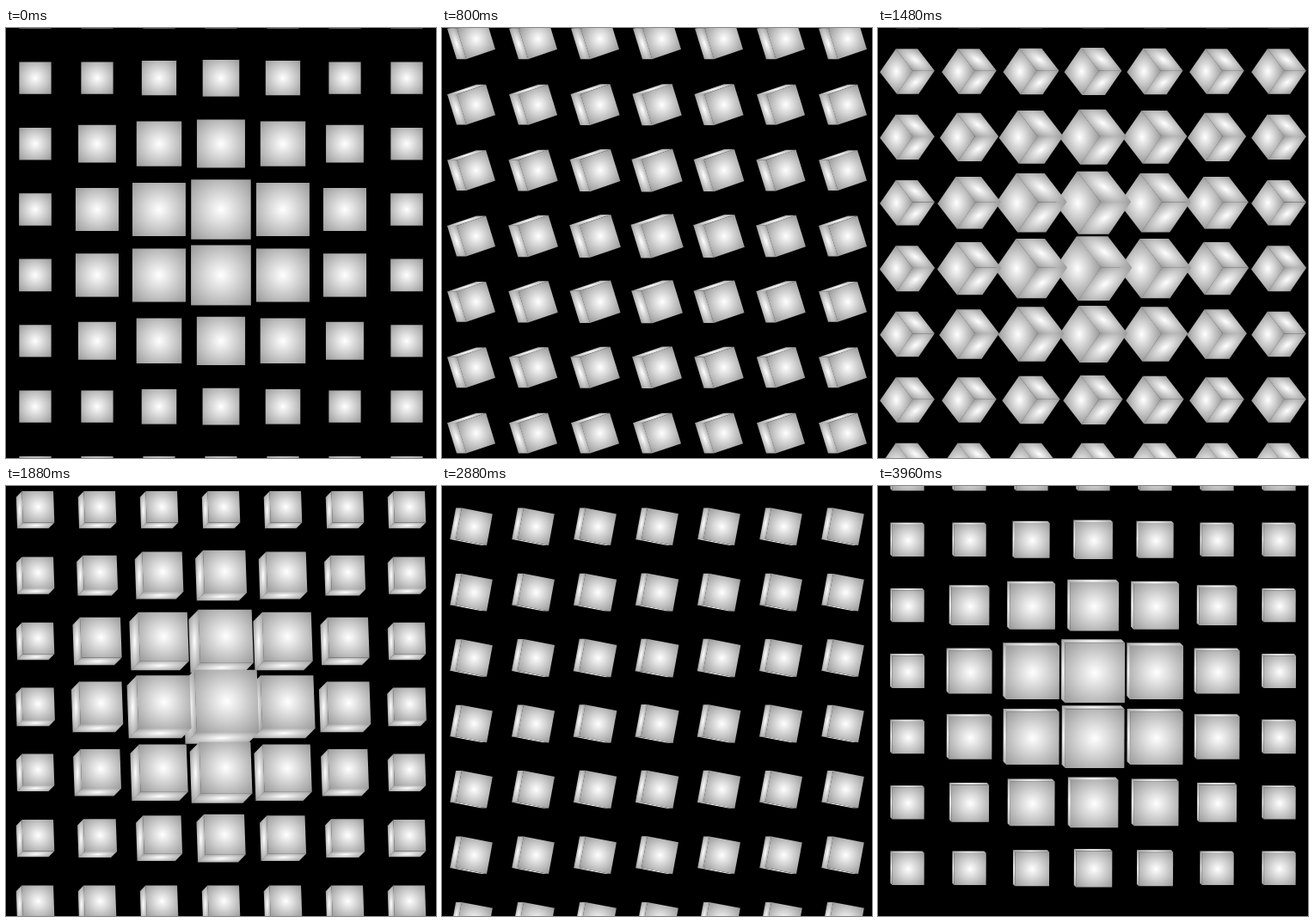
Recreate the animation shown at these times as an HTML page with a canvas. Size 500 by 500 pixels, loop 4 s.

```html
<!DOCTYPE html>
<html lang="en">
<head>
<meta charset="utf-8">
<title>Pulsing cubes</title>
<style>
  html, body { margin: 0; width: 100%; height: 100%; overflow: hidden; background: #000; }
  canvas { display: block; width: 100vw; height: 100vh; }
</style>
</head>
<body>
<canvas id="stage" width="500" height="500"></canvas>
<script>
const ctx = document.getElementById('stage').getContext('2d');

const LOOP = 4000;
const SIZE = 37;            // resting edge of a cube
const SWELL = 1.05;         // extra scale at the centre
const REACH = 222;          // radius of the swelling
const STEP_X = 72, STEP_Y = 76.4;
const LEFT = 34, TOP = 58.3;
const SCROLL = 227.5;       // upward travel per loop
const CENTER = 250;

const shade = ctx.createRadialGradient(0, 0, 0, 0, 0, Math.SQRT1_2);
shade.addColorStop(0, '#fff');
shade.addColorStop(1, '#999');

// Cube axes on screen (x right, y down, z to the viewer): yaw by -a after pitch by a.
function cubeAxes(a) {
  const s = Math.sin(a), c = Math.cos(a);
  return [
    [c, 0, s],
    [-s * s, c, c * s],
    [-s * c, -s, c * c]
  ];
}

function visibleFaces(axes) {
  return axes.map((n, i) => {
    const sign = n[2] < 0 ? -1 : 1;
    return {
      depth: n[2] * sign,
      x: n[0] * sign / 2,
      y: n[1] * sign / 2,
      u: axes[(i + 1) % 3],
      v: axes[(i + 2) % 3]
    };
  }).filter(f => f.depth > 1e-4).sort((p, q) => p.depth - q.depth);
}

// Positive when the far end of the cube along screen axis k is nearer to the viewer.
const lean = (axes, k) => axes.reduce((sum, n) => sum + Math.sign(n[k]) * n[2], 0);

function ordered(from, to, reverse) {
  const list = [];
  for (let i = from; i <= to; i++) list.push(i);
  return reverse ? list.reverse() : list;
}

function drawCube(x, y, size, faces) {
  for (const f of faces) {
    ctx.setTransform(
      f.u[0] * size, f.u[1] * size,
      f.v[0] * size, f.v[1] * size,
      x + f.x * size, y + f.y * size
    );
    ctx.fillRect(-0.503, -0.503, 1.006, 1.006);
  }
}

function draw(ms) {
  const p = (ms % LOOP) / LOOP;
  const axes = cubeAxes(p * 2 * Math.PI);
  const faces = visibleFaces(axes);
  const swell = SWELL * (1 + Math.cos(p * 4 * Math.PI)) / 2;
  const shift = (SCROLL * p) % STEP_Y;
  const cols = ordered(0, 6, lean(axes, 0) > 0);
  const rows = ordered(-1, 7, lean(axes, 1) > 0);

  ctx.setTransform(1, 0, 0, 1, 0, 0);
  ctx.fillStyle = '#000';
  ctx.fillRect(0, 0, 500, 500);
  ctx.fillStyle = shade;
  for (const r of rows) {
    const y = TOP + r * STEP_Y - shift;
    for (const c of cols) {
      const x = LEFT + c * STEP_X;
      const near = Math.max(0, 1 - Math.hypot(x - CENTER, y - CENTER) / REACH);
      drawCube(x, y, SIZE * (1 + swell * near), faces);
    }
  }
}

const start = performance.now();
function tick(now) {
  draw(Math.max(0, now - start));
  requestAnimationFrame(tick);
}
draw(0);
requestAnimationFrame(tick);
</script>
</body>
</html>
```
